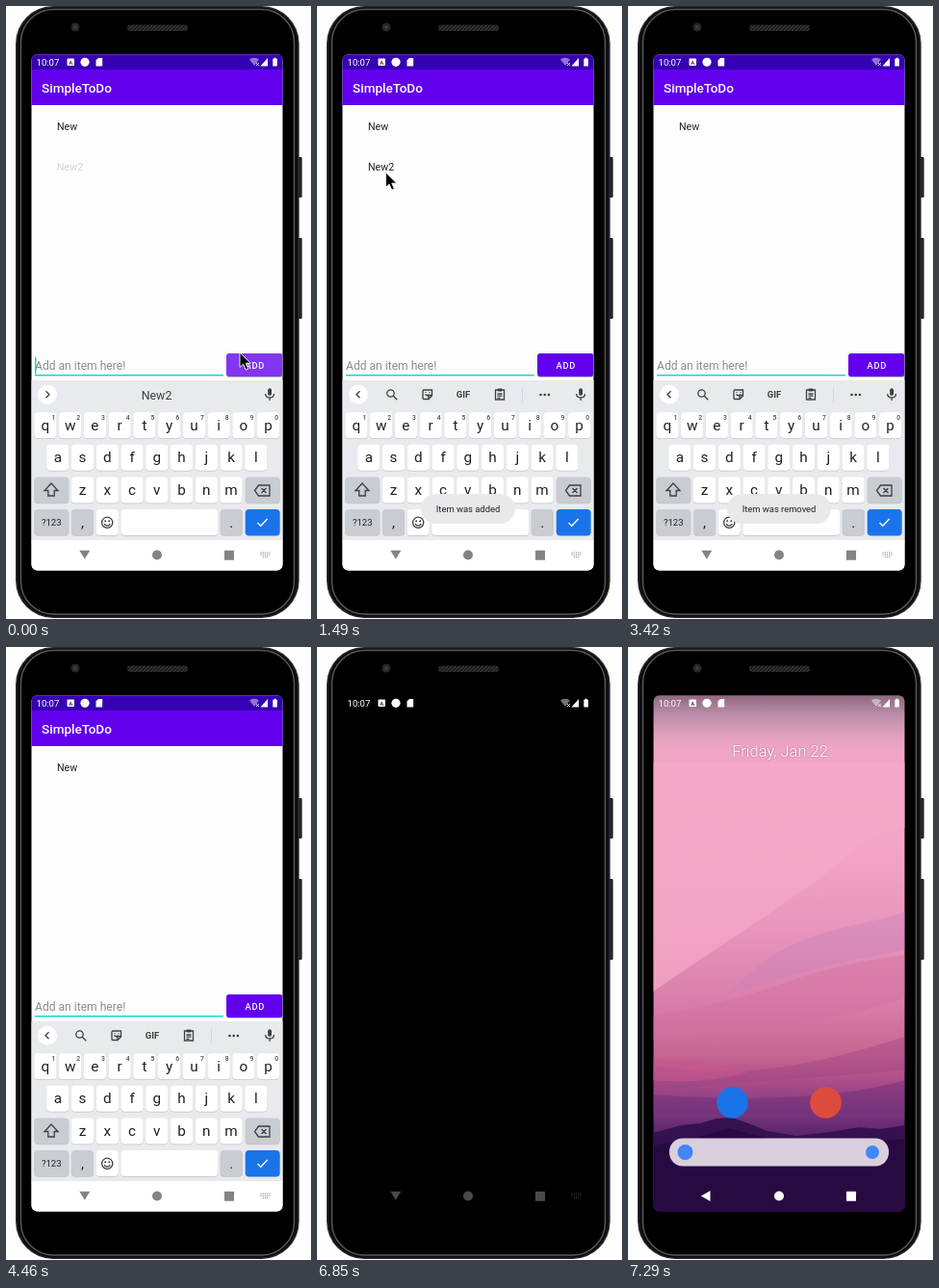
An HTML page for the animation above (8 s loop, 317 by 637 pixels).

```html
<!DOCTYPE html>
<html lang="en">
<head>
<meta charset="utf-8">
<title>To-do app on a phone</title>
<style>
html, body { margin: 0; width: 100%; height: 100%; overflow: hidden; background: #fefefe; }
svg { display: block; width: 317px; height: 637px; font-family: Roboto, sans-serif; }
.line { fill: none; stroke: #3c4043; stroke-width: 1.3; }
</style>
</head>
<body>
<svg id="stage" viewBox="0 0 317 637"></svg>
<script>
const TICK = 148.9, LOOP = 8000;
const CARET_ON = [[0, 3], [7, 10], [13, 17], [20, 23], [26, 30], [33, 36], [40, 43]];

const rect = (x, y, w, h, fill, r = 0, more = '') =>
  `<rect x="${x}" y="${y}" width="${w}" height="${h}" rx="${r}" fill="${fill}" ${more}/>`;
const circle = (x, y, r, fill, more = '') => `<circle cx="${x}" cy="${y}" r="${r}" fill="${fill}" ${more}/>`;
const path = (d, fill, more = '') => `<path d="${d}" fill="${fill}" ${more}/>`;
const line = d => `<path class="line" d="${d}"/>`;
const text = (s, x, y, size, fill, more = '') =>
  `<text x="${x}" y="${y}" font-size="${size}" fill="${fill}" ${more}>${s}</text>`;
const group = (id, body) => `<g id="${id}">${body}</g>`;
const MID = 'text-anchor="middle" ', MEDIUM = 'font-weight="500" ';

function phone() {
  return rect(303, 157, 4.7, 42, '#252525', 1) + rect(303, 241, 4.7, 84, '#252525', 1) +
    rect(10, 0, 294.7, 636, '#29292b', 39) +
    rect(11.5, 1.5, 291.7, 633, '#0b0b0c', 37.5) +
    rect(15.5, 3.5, 284, 628.5, '#000', 34, 'stroke="#58595c" stroke-width="1.4"') +
    circle(72, 22, 4.5, '#26272b') + circle(72, 22, 2, '#3b3d48') +
    rect(126, 19.5, 63, 6.5, 'url(#mesh)', 3.2);
}

function statusBar() {
  return text('10:07', 31.5, 61.8, 9.6, '#fff') +
    rect(63.5, 54.5, 7.5, 7.5, '#fff', 1) + text('A', 67.2, 60.7, 6, '#333', MID + 'font-weight="700"') +
    circle(82, 58.3, 4.6, '#fff') +
    path('M93.5 56.5l2.500-2.500h4.200v8.500h-6.700z', '#fff') +
    path('M253 55.500q5-3.500 10 0l-5 6.500z', '#fff', 'opacity=".45"') +
    path('M260 59l3 3m0-3l-3 3', 'none', 'stroke="#fff" stroke-width=".8"') +
    path('M264.500 62.500h7.500v-8.500z', '#fff') +
    path('M277.300 54.800h1.300v-1h2v1h1.300v7.700h-4.600z', '#fff');
}

function navBar(color, back) {
  return path(back, color) + circle(157, 570.5, 5, color) + rect(227, 565.7, 10, 10, color, .5);
}
const DOWN = 'M76.300 565.700h11l-5.500 9z';

function keyIcon(color) {
  let dots = '';
  for (let y = 0; y < 3; y++)
    for (let x = 0; x < 5 - (y === 2) * 2; x++)
      dots += rect(264.5 + (y === 2) * 2.2 + x * 2.2, 567.5 + y * 2.2, 1.1, 1.1, color);
  return dots;
}

function key(x, y, w, label = '', fill = '#fff', size = 15.3) {
  return rect(x, y + .8, w, 27, '#c0c3c7', 4) + rect(x, y, w, 27, fill, 4) +
    text(label, x + w / 2, y + 13.3 + size * .35, size, '#202124', MID);
}

function keyboard() {
  const grey = '#c9ccd1', pitch = 25.75;
  const row = (letters, x, y) => [...letters].map((c, i) => key(x + i * pitch, y, 23.2, c)).join('');
  const hints = [...'1234567890'].map((c, i) => text(c, 49.5 + i * pitch, 430, 6.8, '#4a4d51', MID + MEDIUM)).join('');
  return rect(26, 389, 262, 167, '#e8eaed') +
    row('qwertyuiop', 29.3, 422.3) + hints + row('asdfghjkl', 42.2, 455.8) + row('zxcvbnm', 67.9, 489.4) +
    key(29.3, 489.4, 36, '', grey) + key(248.7, 489.4, 36, '', grey) +
    key(29.3, 523, 36, '?123', grey, 9.5) + key(67.9, 523, 23.2, ',', grey) + key(93.6, 523, 23.2) +
    key(119.3, 523, 101) + key(222.7, 523, 23.2, '.', grey) + rect(248.7, 523, 36, 27.5, '#1a73e8', 4) +
    line('M47 496l7 7.500h-3.800v5.500h-6.400v-5.500h-3.800z') +
    line('M258.500 503.500l4-5.500h11.500v11h-11.500zM265.500 501l5 5m0-5l-5 5') +
    path('M261.500 537l3.200 3.300 7-7.300', 'none', 'stroke="#fff" stroke-width="1.4"') +
    circle(105.2, 536.8, 5.6, 'none', 'class="line"') +
    circle(103.2, 535.3, 1, '#3c4043') + circle(107.2, 535.3, 1, '#3c4043') + line('M102 538.300q3.200 3.500 6.400 0') +
    circle(43, 403.7, 10, '#fff') +
    rect(272.2, 397.3, 3.8, 7.5, '#3c4043', 1.9) + line('M269.700 403q0 4 4.400 4t4.400-4M274.100 407v3') +
    group('suggest', line('M41.500 400.200l3.500 3.500-3.500 3.500') + text('New2', 156.5, 408.5, 12.4, '#3c4043', MID)) +
    group('tools', line('M44.500 400.200l-3.500 3.500 3.500 3.500') +
      circle(76.5, 402.5, 3.7, 'none', 'class="line"') + line('M79.300 405.300l4 4') +
      line('M111 399h8.500v6l-3.500 3.500h-5q-1 0-1-1v-7.500q0-1 1-1zM119.500 404.500h-3.500v4M112.500 403.500q2 2.500 4 0') +
      circle(113, 401.6, .7, '#3c4043') + circle(117, 401.6, .7, '#3c4043') +
      text('GIF', 152, 407, 9.4, '#3c4043', MID + 'font-weight="700"') +
      line('M185.500 399h9v10h-9zM187.500 403h5m-5 2.200h5m-5 2.200h3') + rect(187.5, 397.5, 5, 3, '#3c4043', 1) +
      rect(213, 396, .8, 16, '#cfd2d6') + [232.5, 236.7, 240.9].map(x => circle(x, 404, 1.3, '#3c4043')).join(''));
}

function toast(id, label, x, w) {
  return group(id, rect(x, 507, w, 31, '#e9e9eb', 15.5) + text(label, 157, 526.3, 9.4, '#202124', MID));
}

function app() {
  return rect(26, 50, 262, 537, '#fdfdfd') +
    rect(26, 50, 262, 16, '#3700b3') + rect(26, 66, 262, 37, '#6200ee') +
    text('SimpleToDo', 37, 89.8, 13.55, '#fff', MEDIUM) +
    text('New', 53, 129, 10.7, '#222') + group('second', text('New2', 53, 171.3, 10.7, '#222')) +
    text('Add an item here!', 30, 378.3, 12.1, '#8c8c8c') +
    rect(30, 383, 196, 1.4, '#03dac5') + rect(30, 365, 1.4, 17.5, '#03dac5', 0, 'id="caret"') +
    rect(229, 362, 58.5, 24, '#bbb', 3) + rect(229, 361, 58.5, 24, '#6200ee', 3, 'id="button"') +
    text('ADD', 258.8, 376.9, 9.3, '#fff', MID + MEDIUM + 'letter-spacing=".83"') +
    keyboard() +
    rect(26, 555, 262, 32, '#fff') + navBar('#838383', DOWN) + keyIcon('#838383') +
    toast('added', 'Item was added', 108, 98) + toast('removed', 'Item was removed', 103, 108);
}

function home() {
  return rect(26, 50, 262, 537, 'url(#sky)') +
    path('M26 120H288V188Q255 192 230 215T130 288T26 358z', '#f6a8c7', 'opacity=".75"') +
    path('M150 320Q190 298 230 290T288 275V315Q220 325 100 362z', '#c67fb8', 'opacity=".4"') +
    path('M26 383Q100 372 160 350T288 320V365Q180 400 26 408z', '#cf6f9d', 'opacity=".4"') +
    path('M26 435Q90 446 150 438T288 405V440Q180 448 26 460z', '#9c4184', 'opacity=".4"') +
    path('M26 428Q75 430 125 442Q75 455 26 450z', '#c9588d', 'opacity=".6"') +
    path('M26 465Q110 472 180 467T288 450V485H26z', '#722f78', 'opacity=".5"') +
    path('M26 505L55 497 75 495 92 490 108 489 125 495 145 503 175 508 210 504 240 499 262 501 288 497V587H26z', '#351150') +
    path('M26 518L70 510 105 500 150 512 200 518 288 511V587H26z', '#270a42') +
    text('Friday, Jan 22', 158, 114, 16.5, '#fff', MID + 'font-weight="300" style="text-shadow:0 0 2px #0006"') +
    circle(108.5, 473.5, 16.3, '#1a73e8') + circle(205.5, 473.5, 16.3, '#dd4b3e') +
    rect(43, 510.5, 228, 29, '#d9cfdd', 14) + circle(59.5, 525, 8, '#4285f4') + circle(254, 525, 7, '#4285f4') +
    navBar('#fff', 'M85.500 565v11l-9.500-5.500z');
}

const SKY = [[0, '#8d687f'], [.035, '#b98ba5'], [.075, '#dfa0bd'], [.1, '#efa5c3'], [.3, '#f4a5c6'],
  [.46, '#e795bb'], [.6, '#d87da9'], [.7, '#c5648f'], [.75, '#aa4c88'], [.8, '#813a80'], [.85, '#5b256c']];
const stage = document.getElementById('stage');
stage.innerHTML = `<defs>
  <clipPath id="screen">${rect(26.5, 50.3, 261, 536.2, '#000', 6)}</clipPath>
  <linearGradient id="sky" x2="0" y2="1">${SKY.map(([at, c]) => `<stop offset="${at}" stop-color="${c}"/>`).join('')}</linearGradient>
  <pattern id="mesh" width="4" height="4" patternUnits="userSpaceOnUse">${rect(0, 0, 4, 4, '#202020')}
    <path d="M0 4L4 0" stroke="#3c3c3c"/></pattern></defs>` +
  phone() +
  '<g clip-path="url(#screen)">' +
  group('off', navBar('#4a4a4a', DOWN) + keyIcon('#3a3a3a')) +
  group('app', app()) + group('home', home()) + statusBar() + '</g>' +
  group('mouse', path('M0 0v15.500l3.600-3.300 2.600 6 2.700-1.200-2.600-5.800h5z', '#000', 'stroke="#fff" stroke-width=".9"'));

const part = {};
for (const el of stage.querySelectorAll('g[id], rect[id]')) part[el.id] = el;
const ramp = (n, from, to) => Math.max(0, Math.min(1, (n - from) / (to - from)));
const fade = (id, value) => part[id].setAttribute('opacity', value);

function draw(n) {
  const open = n < 46;
  fade('app', +open);
  fade('off', +!open);
  fade('home', ramp(n, 46, 49));
  fade('caret', +CARET_ON.some(([a, b]) => n >= a && n < b));
  fade('second', n < 10 ? .18 + .82 * ramp(n, 0, 2) : 1 - ramp(n, 12, 14));
  fade('suggest', +(n < 2));
  fade('tools', +(n >= 2));
  fade('added', ramp(n, 1, 4) * (1 - ramp(n, 12, 14)));
  fade('removed', ramp(n, 13, 16) * (1 - ramp(n, 26, 29)));
  part.button.setAttribute('fill', n < 1 ? '#8236ef' : n < 2 ? '#7420ee' : '#6200ee');

  const p = ramp(n, 2, 7), move = p * p * (3 - 2 * p);
  const nudge = n >= 20 ? 5 : 0;
  part.mouse.setAttribute('transform', `translate(${243 - 171.5 * move} ${360 - 187 * move - nudge})`);
  fade('mouse', +(n < 21));
}

const start = performance.now();
function loop() {
  const t = (performance.now() - start) % LOOP;
  draw(Math.floor((t + 10) / TICK));
  requestAnimationFrame(loop);
}
loop();
</script>
</body>
</html>
```
